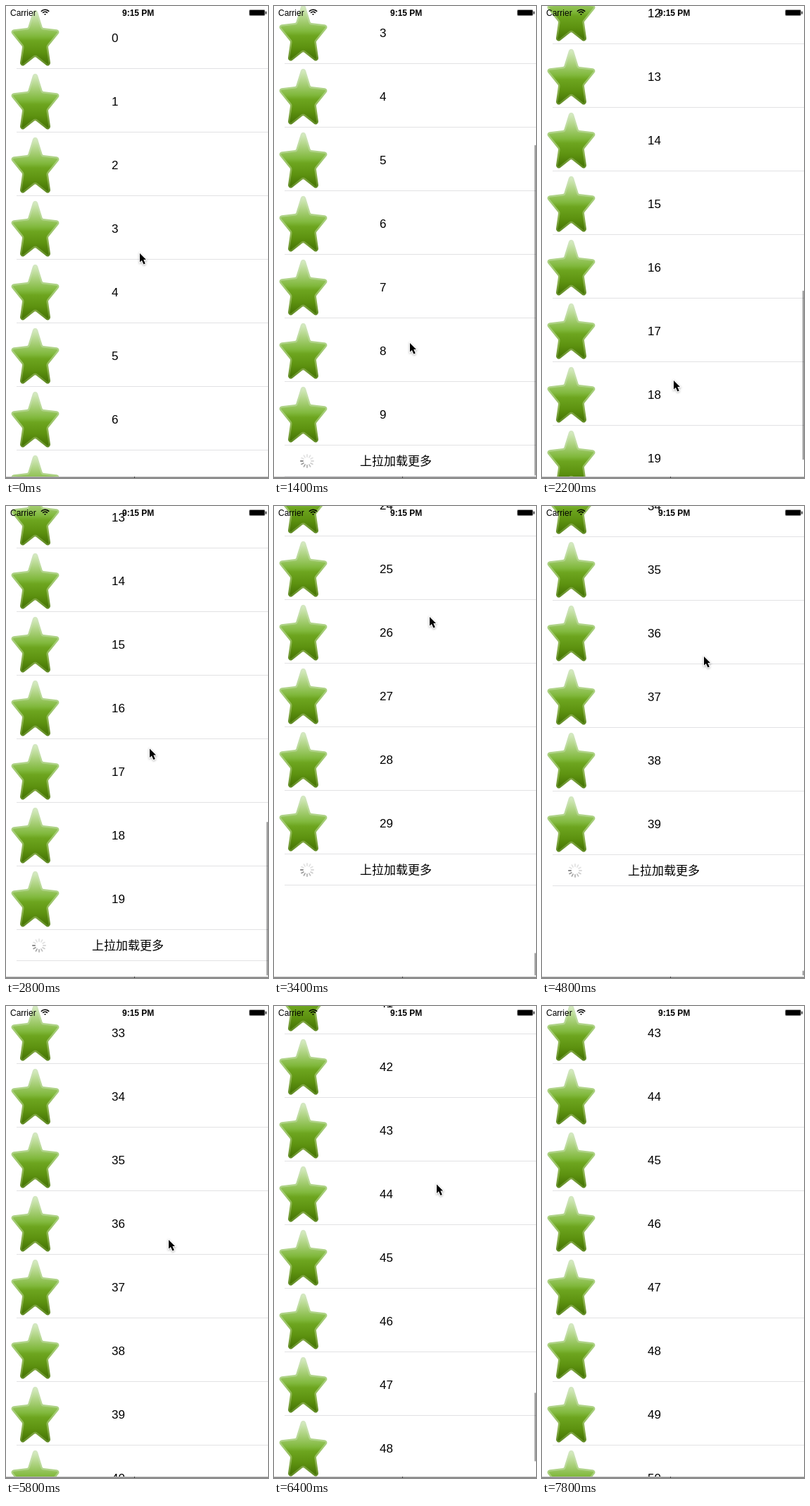
These frames come from a looping animation (372 by 668 pixels, 8000 ms). An HTML page with a canvas:

```html
<!DOCTYPE html>
<html lang="zh">
<head>
<meta charset="utf-8">
<style>
html, body { margin: 0; width: 100%; height: 100%; overflow: hidden; background: #fff; }
canvas { display: block; }
</style>
</head>
<body>
<canvas id="stage" width="372" height="668"></canvas>
<script>
const ctx = document.getElementById('stage').getContext('2d');
const W = 372, VIEW = 667, ROW = 90, FOOTER = 44, PAGE = 10;
const LOOP = 8000, STEP = 200;
const SANS = '"Liberation Sans", Arial, sans-serif';
const CJK = '"Noto Sans CJK SC", "Noto Sans CJK", sans-serif';

// Each pull runs from its start to its peak, springs back, then loads a page.
const PULLS = [[200, 1000], [1400, 2504], [2900, 3400], [3900, 4820], [5800, 6700]];
const OVERSCROLL = 129, SETTLE = 400, BAR_HOLD = 500;
// time, x, y
const POINTER = [[0, 190, 350], [1400, 193, 477], [2200, 187, 530],
  [3400, 221, 157], [4800, 230, 213], [5800, 231, 331], [6800, 231, 200]];

const clamp = u => Math.max(0, Math.min(1, u));
const smooth = u => u * u * (3 - 2 * u);
const ease = (t, from, to) => smooth(clamp((t - from) / (to - from)));
const maxScroll = rows => rows * ROW + FOOTER - VIEW;

function listState(t) {
  let scroll = 0, rows = PAGE, bar = false;
  PULLS.forEach(([start, peak], i) => {
    const end = maxScroll(PAGE * (i + 1));
    const before = i ? maxScroll(PAGE * i) : 0;
    scroll += (end + OVERSCROLL - before) * ease(t, start, peak)
      - OVERSCROLL * ease(t, peak, peak + SETTLE);
    if (t > peak + SETTLE) rows += PAGE;
    if (t > start && t < peak + BAR_HOLD) bar = true;
  });
  return { scroll: Math.round(scroll), rows, bar };
}

function gradient(y0, y1, ...colors) {
  const g = ctx.createLinearGradient(0, y0, 0, y1);
  colors.forEach(([at, color]) => g.addColorStop(at, color));
  return g;
}

// Half outline: distance from the axis, height, corner radius; mirrored for the left side.
function makeStar(cx) {
  const half = [[0, 1, 2.5], [9.5, 32, 3], [35, 35, 2.5], [17, 57, 4], [21.1, 86.6, 2.5], [0, 70, 4]];
  const left = half.slice(1, -1).reverse().map(([x, y, r]) => [-x, y, r]);
  const points = [...half, ...left];
  const path = new Path2D();
  path.moveTo(cx + 4.75, 16.5);
  for (let i = 1; i <= points.length; i++) {
    const [x, y, r] = points[i % points.length];
    const [nx, ny] = points[(i + 1) % points.length];
    path.arcTo(cx + x, y, cx + nx, ny, r);
  }
  path.closePath();
  return path;
}

const starPath = makeStar(41.5);
const starBody = gradient(7, 85,
  [0, '#d9edc4'], [.25, '#a9d07a'], [.46, '#80b83c'], [.54, '#6da51f'], [.75, '#5d9210'], [1, '#416e02']);
const starRim = gradient(6, 86, [0, '#d5e8c4'], [.45, '#a3cc75'], [.75, '#8ab04d'], [1, '#57831a']);
const arrowPath = new Path2D('M0 0V14L3.2 11L6 17.3L8.6 16.1L5.9 10H10Z');

function text(str, x, y, font) {
  ctx.font = font;
  ctx.fillStyle = '#000';
  ctx.fillText(str, x, y);
}

function box(x, y, w, h, r, color) {
  ctx.fillStyle = color;
  ctx.beginPath();
  ctx.roundRect(x, y, w, h, r);
  ctx.fill();
}

const separator = y => box(15, y, W - 15, 1, 0, '#e2e2e4');

function star(y) {
  ctx.save();
  ctx.translate(0, y);
  ctx.lineJoin = 'round';
  ctx.fillStyle = starBody;
  ctx.fill(starPath);
  ctx.strokeStyle = starRim;
  ctx.lineWidth = 2.5;
  ctx.stroke(starPath);
  ctx.restore();
}

function spinner(cx, cy) {
  ctx.save();
  ctx.translate(cx, cy);
  ctx.rotate(Math.PI);
  for (let i = 0; i < 12; i++) {
    const shade = Math.min(226, 140 + i * 13);
    box(5, -.9, 5, 1.8, .9, `rgb(${shade},${shade},${shade})`);
    ctx.rotate(-Math.PI / 6);
  }
  ctx.restore();
}

function list({ scroll, rows }) {
  for (let n = Math.floor(scroll / ROW); n < rows; n++) {
    const y = n * ROW - scroll;
    if (y > VIEW) return;
    star(y);
    text(n, 150, y + 51, `17px ${SANS}`);
    separator(y + 88);
  }
  const y = rows * ROW - scroll;
  spinner(47, y + 21);
  text('上拉加载更多', 122, y + 27, `300 17px ${CJK}`);
  separator(y + FOOTER - 2);
}

function scrollbar({ scroll, rows, bar }) {
  if (!bar) return;
  const track = VIEW - 5, max = maxScroll(rows);
  const over = Math.max(0, scroll - max);
  const length = Math.max(7, track * VIEW / (max + VIEW) - over);
  const top = 2.5 + clamp(scroll / max) * (track - length);
  box(369.75, top, 2.25, length, 1, 'rgba(0,0,0,.36)');
}

function statusBar() {
  text('Carrier', 6, 13.5, `12px ${SANS}`);
  text('9:15 PM', 165, 13.5, `bold 12px ${SANS}`);

  ctx.strokeStyle = '#000';
  ctx.lineWidth = 1.6;
  for (const r of [1.3, 4.7, 7.7]) {
    ctx.beginPath();
    ctx.arc(55.5, 13, r, -Math.PI * .76, -Math.PI * .24);
    ctx.stroke();
  }

  box(345, 5, 23, 9, 2, '#888');
  box(346, 6, 21, 7, 1, '#000');
  box(368.5, 7.5, 1.3, 4, .6, '#000');
}

function pointer(t) {
  const i = POINTER.findIndex(([time]) => time > t);
  if (i < 0) return;
  const [t0, x0, y0] = POINTER[i - 1], [t1, x1, y1] = POINTER[i];
  const u = (t - t0) / (t1 - t0);
  ctx.save();
  ctx.translate(x0 + (x1 - x0) * u, y0 + (y1 - y0) * u);
  ctx.scale(.9, .9);
  ctx.shadowColor = 'rgba(0,0,0,.35)';
  ctx.shadowBlur = 3;
  ctx.shadowOffsetY = 1;
  ctx.strokeStyle = '#fff';
  ctx.lineWidth = 2;
  ctx.stroke(arrowPath);
  ctx.shadowColor = 'transparent';
  ctx.fillStyle = '#000';
  ctx.fill(arrowPath);
  ctx.restore();
}

function bottomEdge() {
  box(0, 666, W, 1, 0, '#b4b4b4');
  box(0, 667, W, 1, 0, '#858585');
  box(182, 666, 1, 2, 0, '#444');
}

function draw(now) {
  const t = Math.floor(now % LOOP / STEP) * STEP;
  const state = listState(t);
  box(0, 0, W, 668, 0, '#fff');
  list(state);
  scrollbar(state);
  statusBar();
  pointer(t);
  bottomEdge();
}

const start = performance.now();
function tick() {
  draw(performance.now() - start);
  requestAnimationFrame(tick);
}
tick();
</script>
</body>
</html>
```
